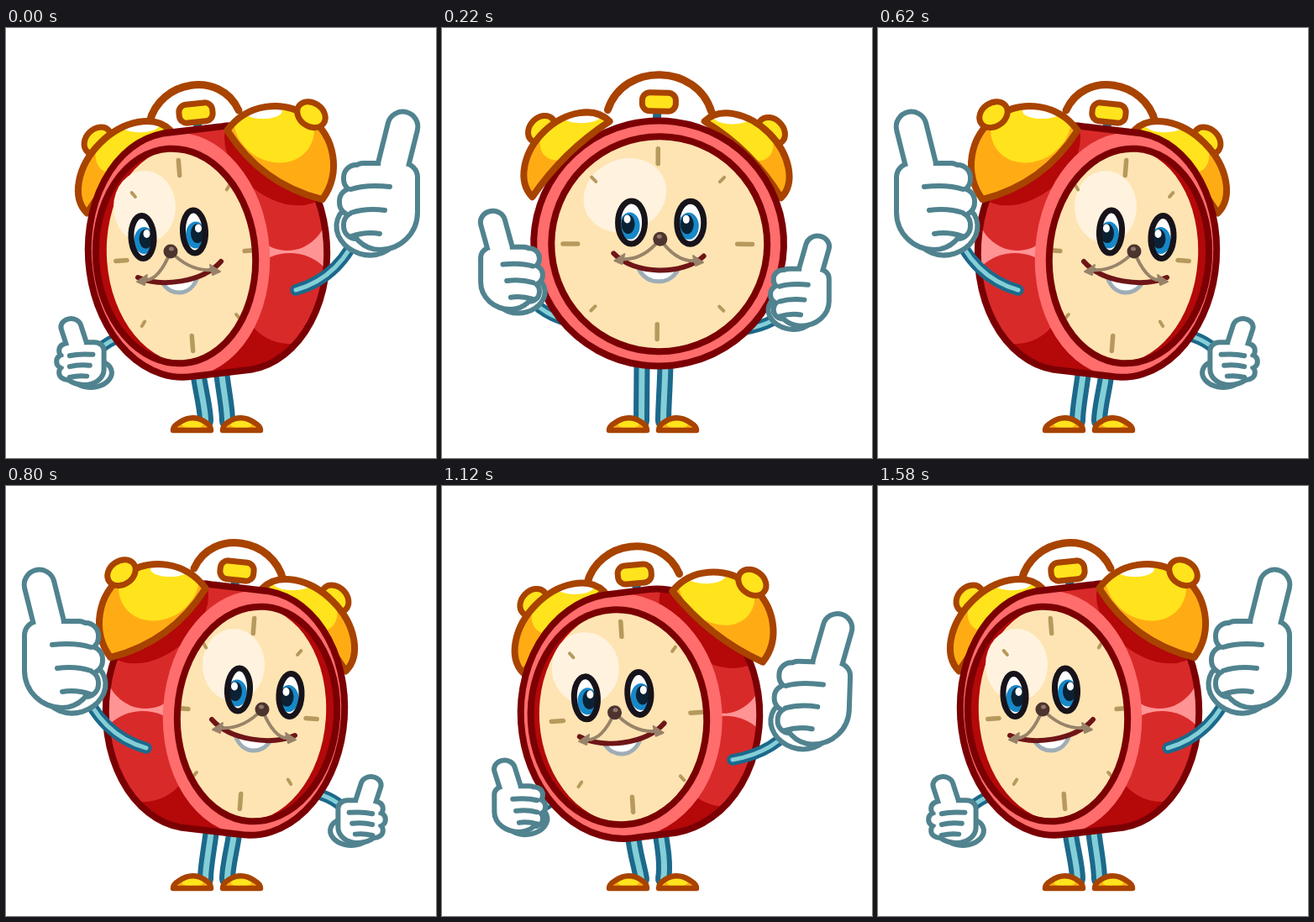
Animation, 512 px wide and 512 px high, one loop 1600 ms. Source, as an HTML page with a canvas:

```html
<!DOCTYPE html>
<html lang="en">
<head>
<meta charset="utf-8">
<title>Cheerful alarm clock</title>
<style>
html, body { margin: 0; width: 100%; height: 100%; overflow: hidden; background: #fff; }
canvas { display: block; width: 512px; height: 512px; }
</style>
</head>
<body>
<canvas id="stage" width="512" height="512"></canvas>
<script>
const ctx = document.getElementById('stage').getContext('2d');
ctx.lineCap = ctx.lineJoin = 'round';

const LOOP = 1600, HALF = 800, TURN_MS = 395, AXIS = 250.5, RAD = Math.PI / 180;
const C = {
  maroon: '#7b0003', dark: '#b40809', red: '#d92a2a', pink: '#ff6d6d', shine: '#ff9494',
  cream: '#fee4b2', glare: '#fff3df', tick: '#b6995c', brown: '#a84300', yellow: '#ffe31c',
  orange: '#ffac14', teal: '#1c698b', aqua: '#84cfd7', glove: '#50838f', tan: '#98836a'
};

const clamp = v => Math.max(0, Math.min(1, v));
const smooth = v => { v = clamp(v); return v * v * (3 - 2 * v); };
const hump = (t, from, to) => Math.sin(Math.PI * clamp((t - from) / (to - from))) ** 2;
const lerp = (a, b, k) => Array.isArray(a) ? a.map((v, i) => v + (b[i] - v) * k) : a + (b - a) * k;

function paint(fill, stroke, width) {
  if (fill) { ctx.fillStyle = fill; ctx.fill(); }
  if (stroke) { ctx.strokeStyle = stroke; ctx.lineWidth = width; ctx.stroke(); }
}
function oval([x, y, rx, ry, deg = 0], fill, stroke, width) {
  ctx.beginPath();
  ctx.ellipse(x, y, rx, ry, deg * RAD, 0, 7);
  paint(fill, stroke, width);
}
function line(x0, y0, x1, y1, color, width) {
  ctx.beginPath();
  ctx.moveTo(x0, y0);
  ctx.lineTo(x1, y1);
  paint(null, color, width);
}
function bend([x, y, ...controls], fill, stroke, width) {
  ctx.beginPath();
  ctx.moveTo(x, y);
  if (controls.length === 4) ctx.quadraticCurveTo(...controls);
  else ctx.bezierCurveTo(...controls);
  paint(fill, stroke, width);
}
function limb(points, width, core) {
  bend(points, null, C.teal, width);
  bend(points, null, C.aqua, core);
}
function scoped(draw) {
  ctx.save();
  draw();
  ctx.restore();
}
function mirrored(axis, on, draw) {
  scoped(() => {
    if (on) {
      ctx.translate(2 * axis, 0);
      ctx.scale(-1, 1);
    }
    draw();
  });
}

// A dome standing on its rim; local x runs along the rim, local -y points outward.
function bell(front, turned, k, knobOnTop) {
  const [x, y, half, height, bow, angle] = lerp(front, turned, k);
  const dome = () => {
    ctx.beginPath();
    ctx.ellipse(0, 0, half, height, 0, Math.PI, 2 * Math.PI);
    ctx.quadraticCurveTo(0, -2 * bow, -half, 0);
    ctx.closePath();
  };
  const knob = () => oval([0, -height - 4, 18, 14], C.yellow, C.brown, 7);
  scoped(() => {
    ctx.translate(x, y);
    ctx.rotate(angle * RAD);
    if (!knobOnTop) knob();
    scoped(() => {
      dome();
      ctx.clip();
      paint(C.orange);
      oval([-.42 * half, -.55 * height, .72 * half, .62 * height], C.yellow);
      oval([-.7 * half, -.62 * height, 23, 9, -angle], '#fff');
    });
    dome();
    paint(null, C.brown, 8);
    if (knobOnTop) knob();
  });
}

function handle(k) {
  bend(lerp([187, 100, 205, 41, 296, 41, 314, 100], [171, 112, 183, 62, 255, 50, 277, 98], k),
    null, C.brown, 9);
  const [x, y, tilt] = lerp([251, 88, 0], [226, 101, -6], k);
  line(x + 2, y + 12, x + 3, y + 28, C.teal, 10);
  scoped(() => {
    ctx.translate(x, y);
    ctx.rotate(tilt * RAD);
    ctx.beginPath();
    ctx.roundRect(-20, -11, 40, 22, 9);
    paint(C.yellow, C.brown, 7);
  });
}

// Hull of the front disc and an equal disc set back by the depth vector.
function casing(k, e) {
  const [x, y] = lerp([250.5, 256.5], [206, 270], k);
  const a = lerp(152, 108, e), b = 146, tilt = -4 * k;
  const depth = clamp((k - .45) / .55), vx = 68 * depth, vy = -8 * depth;
  const cut = Math.atan2(-8 / b, 68 / a), q = Math.PI / 2;
  const hull = () => {
    ctx.beginPath();
    ctx.ellipse(x + vx, y + vy, a, b, tilt * RAD, cut - q, cut + q);
    ctx.ellipse(x, y, a, b, tilt * RAD, cut + q, cut + 3 * q);
    ctx.closePath();
  };
  scoped(() => {
    hull();
    ctx.clip();
    paint(C.dark);
    oval([230, 150, 80, 60], C.red);
    ctx.fillStyle = C.shine;
    ctx.fillRect(290, 233, 110, 62);
    oval([335, 215, 48, 50], C.red);
    oval([324, 153, 72, 48, 38], C.dark);
    oval([338, 322, 56, 54], C.red);
    oval([x, y, a, b, tilt], C.pink);
  });
  hull();
  paint(null, C.maroon, 8);
}

function dial(k, e, turn, mirror) {
  const tilt = -4 * k;
  const hole = [...lerp([250.5, 257], [202, 271.5], k), lerp(131, 95, e), 128, tilt];
  scoped(() => {
    oval(hole, C.dark);
    ctx.clip();
    const [x, y] = lerp([250.5, 257], [211, 271], k);
    oval([x, y, lerp(131, 91, e), 128, tilt], C.cream);
    const glareX = mirror * (-42 + 13.5 * turn + 9.5 * turn * turn);
    oval([x + glareX, y - 58, lerp(53, 37, k), 43, -28 * mirror * (1 - k)], C.glare);

    const [ox, rx, ry, ux] = lerp([250.5, 110, 1, 1], [214, 77, -6, -8], k);
    for (let i = 0; i < 8; i++) {
      const s = Math.sin(i * Math.PI / 4), c = Math.cos(i * Math.PI / 4);
      const [from, to, width] = i % 2 ? [1, 1.07, 4] : [.91, 1.08, 5.5];
      const dx = rx * s + ux * c, dy = ry * s - 105 * c;
      line(ox + dx * from, y + dy * from, ox + dx * to, y + dy * to, C.tick, width);
    }
  });
  oval(hole, null, C.maroon, 8);
}

function eye([x, y], k, gaze) {
  const ball = [x, y, lerp(16.5, 13.5, k), 25.5, -3 * k];
  scoped(() => {
    oval(ball, '#fff');
    ctx.clip();
    oval([x + gaze * 2, y + 4, 12, 16], '#1688c8');
    oval([x + gaze * 4, y + 2, 8, 11.5], '#0b2234');
    oval([x + gaze * 5, y - 4, 4, 5], '#fff');
  });
  oval(ball, null, '#17131a', 7);
}

function face(k, gaze) {
  const at = (front, turned) => lerp(front, turned, k);
  eye(at([214, 231], [162.5, 249]), k, gaze);
  eye(at([286, 232], [224, 242.5]), k, gaze);

  bend(at([228, 289, 238, 306, 263, 306, 274, 289], [186, 303, 196, 320, 220, 320, 228, 297]),
    '#fff', '#9fadb6', 5);
  bend(at([196, 269, 220, 295, 281, 295, 305, 269], [157, 297, 185, 309, 234, 303, 256, 278]),
    null, '#6f1517', 6);

  const nose = at([250.5, 251], [196, 266]);
  const tips = [at([204, 275], [163, 300]), at([297, 275], [248, 288])];
  tips.forEach(([x, y], i) => {
    const side = i ? 1 : -1;
    bend([...nose, lerp(nose[0], x, .45), y + 3, x, y], null, C.tan, 4);
    ctx.beginPath();
    ctx.moveTo(x + side * 7, y + 2);
    ctx.lineTo(x - side * 5, y - 6);
    ctx.lineTo(x - side * 2, y + 6);
    ctx.closePath();
    paint(C.tan, C.tan, 2);
  });
  oval([...nose, 8.5, 8.5], '#4c342f');
  oval([nose[0] + 1, nose[1] - 3, 3, 2.5], '#91766b');
}

function clock(p) {
  const k = Math.abs(p.turn), e = k ** 1.5, mirror = p.turn > 0 ? -1 : 1;
  const px = AXIS + 50 * p.turn, py = 270, drift = 6 * (1 - k) ** 2 * mirror;
  const front = [354, 158, 64, 44, 8, 45];
  scoped(() => {
    ctx.translate(px + p.dx, py + p.dy);
    ctx.rotate(p.rot * RAD);
    ctx.translate(-px, -py);
    mirrored(AXIS, mirror < 0, () => {
      scoped(() => {
        ctx.translate(drift, 0);
        handle(k);
        mirrored(AXIS, true, () => bell(front, [355, 171, 70, 48, 8, 45], e, false));
      });
      casing(k, e);
      dial(k, e, p.turn, mirror);
      face(k, p.gaze * mirror);
      ctx.translate(drift, 0);
      bell(front, [320, 163, 70, 70, -14, 36], e, k > .65);
    });
  });
}

function legs(p) {
  const bow = Math.max(0, p.dy) * .75;
  for (const side of [-1, 1]) {
    const foot = AXIS + side * 13;
    const hip = AXIS + side * 14 + p.turn * 9 + p.dx * .3 + side * bow * .4;
    limb([hip, 400 + p.dy, hip - p.turn * 2 + side * bow * .4, 425 + p.dy / 2,
      foot + side * bow * .6, 450, foot, 468], 19, 7);
  }
  for (const side of [-1, 1]) mirrored(251, side < 0, () => {
    const shoe = () => {
      ctx.beginPath();
      ctx.moveTo(258, 479);
      ctx.quadraticCurveTo(258, 473, 265, 469);
      ctx.quadraticCurveTo(280, 459, 296, 470);
      ctx.quadraticCurveTo(303, 474, 303, 479);
      ctx.closePath();
    };
    shoe();
    paint(C.orange);
    oval([280, 471, 13, 6], C.yellow);
    shoe();
    paint(null, C.brown, 6.5);
  });
}

function arm(h, near, dy) {
  const [rx, ry] = lerp([350, 362], [345, 312], Math.max(0, near));
  const rootY = ry + dy, wx = h.x - 20 * h.w, wy = h.y + (h.fist ? 0 : 50 * h.h);
  limb([rx, rootY, lerp(rx, wx, .7), lerp(rootY, wy, .2), wx, wy], 13.5, 5);
}

// Parts are merged by stroking them all, then filling over the inner strokes.
function hand(h) {
  const fingerSide = h.fist ? -1 : 1;
  const place = build => scoped(() => {
    ctx.translate(h.x, h.y);
    ctx.rotate(h.rot * RAD);
    ctx.scale(h.w, h.h);
    ctx.beginPath();
    build();
  });
  const merge = build => {
    place(build);
    paint(null, C.glove, 12);
    paint('#fff');
  };
  merge(() => ctx.ellipse(-13, 54, 34, 28, .3, 0, 7));
  merge(() => {
    ctx.roundRect(-31, -21, 75, 97, [14, 14, 42, 34]);
    for (let i = 0; i < 3; i++) {
      const reach = 38 + 5 * (i % 2);
      ctx.roundRect(fingerSide > 0 ? -reach : reach - 40, -19 + 28 * i, 50, 26, 12);
    }
    scoped(() => {
      ctx.translate(24, -46);
      ctx.rotate(14 * RAD);
      ctx.roundRect(-15, -37, 30, 76, 15);
    });
  });
  for (let i = 0; i < 3; i++) {
    place(() => {
      const y = 7 + 28 * i;
      ctx.moveTo(-32 * fingerSide, y);
      ctx.quadraticCurveTo(-14 * fingerSide, y - 6, (14 - 6 * i) * fingerSide, y - 3);
    });
    paint(null, C.glove, 6);
  }
}

function handPose(side, size, lift, bounce) {
  return {
    side, fist: size < .06,
    x: 417 + 26 * size + 4 * bounce * size,
    y: 387 - 202 * lift + 8 * bounce,
    w: .6 + .4 * size + .05 * bounce * size,
    h: .46 + .54 * size + .08 * bounce * size,
    rot: 6 * bounce * size
  };
}

function render(ms) {
  const time = ms % LOOP, dir = time < HALF ? 1 : -1, u = time % HALF;
  const swing = smooth(u / TURN_MS);
  const squat = hump(u, 250, 590), overshoot = hump(u, 300, 520);
  const p = {
    turn: dir * (2 * swing - 1),
    gaze: dir * (1 - 2 * smooth((u - 150) / 60)),
    dx: dir * 9 * overshoot,
    rot: dir * 4 * overshoot,
    dy: 18 * squat - 4 * hump(u, 0, 300)
  };
  const hands = [
    handPose(-dir, swing ** 1.5, clamp(u / 410), squat),
    handPose(dir, 1 - swing ** .75, 1 - swing, squat)
  ];
  const arms = front => hands.forEach(h => {
    const near = -p.turn * h.side;
    if (near > .6 === front) mirrored(256, h.side < 0, () => arm(h, near, p.dy * .7));
  });

  ctx.fillStyle = '#fff';
  ctx.fillRect(0, 0, 512, 512);
  arms(false);
  legs(p);
  clock(p);
  arms(true);
  hands.forEach(h => mirrored(256, h.side < 0, () => hand(h)));
}

const start = performance.now();
function tick() {
  render(Math.floor((performance.now() - start) / 20) * 20);
  requestAnimationFrame(tick);
}
tick();
</script>
</body>
</html>
```
